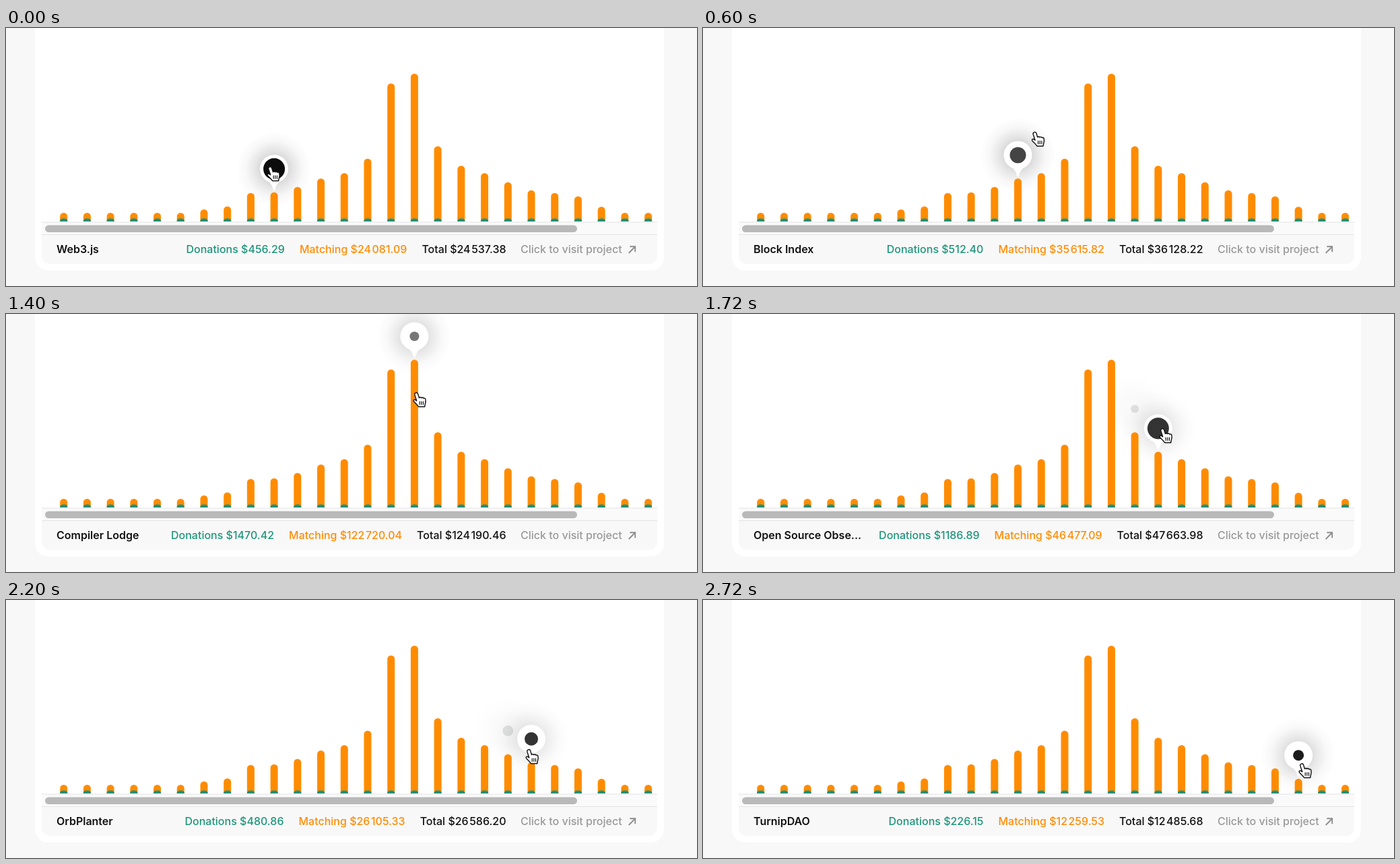
Recreate the animation shown at these times as an HTML page. Size 1026 by 384 pixels, loop 2760 ms.

```html
<!DOCTYPE html>
<html lang="en">
<head>
<meta charset="utf-8">
<title>Funding chart</title>
<style>
html, body { margin: 0; width: 100%; height: 100%; overflow: hidden; background: #f8f8f8; }
#stage { position: relative; width: 1026px; height: 384px; overflow: hidden; }
svg { position: absolute; left: 0; top: 0; }
.info {
  position: absolute; top: 309px; height: 41px;
  font: 500 16px/41px Inter, "Liberation Sans", sans-serif; white-space: nowrap;
}
#name { left: 75px; font-weight: 600; color: #111; }
#sums { right: 283.5px; display: flex; gap: 22px; }
#don { color: #1f957c; }
#mat { color: #ff8c05; }
#tot { color: #111; }
#visit { left: 764px; color: #999; }
.cents { margin-left: 1.5px; }
</style>
</head>
<body>
<div id="stage">
  <svg width="1026" height="384" viewBox="0 0 1026 384">
    <defs>
      <radialGradient id="glow">
        <stop offset=".3" stop-color="#000" stop-opacity=".17"/>
        <stop offset=".5" stop-color="#000" stop-opacity=".1"/>
        <stop offset=".75" stop-color="#000" stop-opacity=".03"/>
        <stop offset="1" stop-color="#000" stop-opacity="0"/>
      </radialGradient>
    </defs>
    <rect x="43" y="-40" width="934" height="401" rx="20" fill="#fff"/>
    <g id="pins"></g>
    <g id="bars"></g>
    <rect x="53" y="288.5" width="914" height="19" fill="#fafafa"/>
    <path d="M53 289H967M53 307.5H967" stroke="#e4e4e4"/>
    <rect x="58" y="293.5" width="790" height="10.5" rx="5.25" fill="#b9b9b9"/>
    <path d="M53 308H967V339a12 12 0 0 1-12 12H65a12 12 0 0 1-12-12Z" fill="#f8f8f8"/>
    <path d="M924.7 335L934 325.5M926.3 325.2H934.2V333.2" fill="none" stroke="#8f8f8f" stroke-width="1.9"/>
  </svg>
  <div id="name" class="info"></div>
  <div id="sums" class="info"><span id="don"></span><span id="mat"></span><span id="tot"></span></div>
  <div id="visit" class="info">Click to visit project</div>
  <svg width="1026" height="384" viewBox="0 0 1026 384">
    <g id="hand" stroke="#111" stroke-width="1.3" stroke-linejoin="round" stroke-linecap="round">
      <path fill="#fff" d="M4 1.2C5.2 .6 6.4 1.2 6.8 2.4L8.6 8C8.9 7 11 6.9 11.5 8.1C12.2 7.2 14 7.4 14.4 8.6C15.3 8 17 8.6 17.2 10C17.6 12.5 17.6 14 16.8 16L16 20H7.8C6.5 17.5 4 15.5 1.5 13C.3 11.6 1.6 10 3.2 10.6L5.2 12L2.6 4C2.3 2.8 2.8 1.6 4 1.2Z"/>
      <path fill="none" stroke-width="1.1" d="M9.3 13V17M11.7 13V17M14.1 13V17"/>
    </g>
  </svg>
</div>
<script>
const LOOP = 2760, STEP = 40, FIRST = 9, BASE = 288;
const $ = id => document.getElementById(id);
const clamp = v => Math.max(0, Math.min(1, v));
const smooth = v => v * v * (3 - 2 * v);

const tops = [275, 275, 275, 275, 275, 275, 270, 265.5, 245.5, 244.5, 236.5, 224, 216,
  194.5, 82.5, 68, 176, 205, 216, 229.5, 241.5, 245.5, 250.5, 266, 275, 275];
const barX = i => 85.7 + i * 34.715;

// start ms, name, donations, matching, total, icon radius, icon colour
const stops = [
  [0, "Web3.js", "456.29", "24081.09", "24537.38", 16, "#0c0c0c"],
  [150, "Rotki", "487.33", "28676.35", "29163.69", 10, "#2b2018"],
  [390, "Block Index", "512.40", "35615.82", "36128.22", 12, "#444"],
  [630, "Node Setup", "541.17", "40102.95", "40644.12", 15, "#0e0e0e"],
  [860, "Web3.py", "586.66", "52241.40", "52828.07", 12, "#333"],
  [1095, "Client Testing", "1392.08", "114895.31", "116287.39", 8, "#666"],
  [1290, "Compiler Lodge", "1470.42", "122720.04", "124190.46", 7, "#777"],
  [1490, "Contract Safety", "1248.53", "61975.66", "63224.19", 6, "#777"],
  [1640, "Open Source Obse...", "1186.89", "46477.09", "47663.98", 16, "#333"],
  [1790, "Key Library", "724.36", "39919.78", "40644.14", 10, "#444"],
  [1955, "Chain Reader", "563.25", "32459.84", "33023.09", 8, "#6f7876"],
  [2120, "OrbPlanter", "480.86", "26105.33", "26586.20", 10, "#333"],
  [2300, "Type Checks", "412.74", "23578.61", "23991.35", 10, "#444"],
  [2460, "Code Lessons", "347.92", "20821.46", "21169.38", 9, "#555"],
  [2600, "TurnipDAO", "226.15", "12259.53", "12485.68", 8, "#1c1c1c"]
];

// pointer: ms, x, y of its middle
const path = [[0, 397, 217], [280, 449, 198], [880, 538, 140.5], [1400, 614, 127.5],
  [1720, 687, 181], [2200, 781, 233], [2720, 894, 254], [2760, 902, 255.5]];

$("bars").innerHTML = tops.map((y, i) => {
  const l = barX(i) - 5.5;
  return `<path fill="#ff8c00" d="M${l} ${BASE}V${y + 5.5}a5.5 5.5 0 0 1 11 0V${BASE}Z"/>
    <path fill="#1f917c" d="M${l} ${BASE}V286.5q1 -3 4 -3h3q3 0 4 3V${BASE}Z"/>`;
}).join("");

$("pins").innerHTML = stops.map(([, , , , , r, fill], n) => {
  const i = FIRST + n;
  return `<g transform="translate(${barX(i)} ${tops[i] - 34.8})">
    <circle r="56" fill="url(#glow)"/>
    <g><path fill="#fff" d="M-9 18H9Q3 23 1.2 31Q0 33.5 -1.2 31Q-3 23 -9 18Z"/>
    <circle r="21" fill="#fff"/><circle r="${r}" fill="${fill}"/></g></g>`;
}).join("");
const pins = [...$("pins").children];

function money(label, sum) {
  const cut = sum.indexOf(".") - 3;
  return cut < 2 ? `${label} $${sum}`
    : `${label} $${sum.slice(0, cut)}<span class="cents">${sum.slice(cut)}</span>`;
}

function slope(k, c) {
  const a = path[Math.max(0, k - 1)], b = path[Math.min(path.length - 1, k + 1)];
  return (b[c] - a[c]) / (b[0] - a[0]);
}

function pointer(t, c) {
  let k = 0;
  while (k < path.length - 2 && path[k + 1][0] <= t) k++;
  const a = path[k], b = path[k + 1], d = b[0] - a[0], u = (t - a[0]) / d;
  const e = smooth(u), v = 1 - u;
  return a[c] * (1 - e) + b[c] * e + d * u * v * (v * slope(k, c) - u * slope(k + 1, c));
}

let shown = -1;
function draw(t) {
  let cur = 0;
  stops.forEach((s, n) => {
    if (s[0] <= t) cur = n;
    const inAge = n ? t - s[0] : LOOP;
    const outAge = n < stops.length - 1 ? t - stops[n + 1][0] : -1;
    const body = clamp(inAge / 80) ** 2 * (1 - smooth(clamp(outAge / 110)));
    const glow = clamp(inAge / 140) * (1 - clamp((outAge - 20) / 70));
    pins[n].style.display = body > 0 ? "" : "none";
    pins[n].children[0].setAttribute("opacity", glow);
    pins[n].children[1].setAttribute("opacity", body);
  });
  if (cur !== shown) {
    const [, name, don, mat, tot] = stops[shown = cur];
    $("name").textContent = name;
    $("don").innerHTML = money("Donations", don);
    $("mat").innerHTML = money("Matching", mat);
    $("tot").innerHTML = money("Total", tot);
  }
  $("hand").setAttribute("transform",
    `translate(${pointer(t, 1) - 10} ${pointer(t, 2) - 11.5}) scale(1.1)`);
}

const start = performance.now();
function tick() {
  const t = (performance.now() - start) % LOOP;
  draw(Math.floor(t / STEP) * STEP);
  requestAnimationFrame(tick);
}
tick();
</script>
</body>
</html>
```
